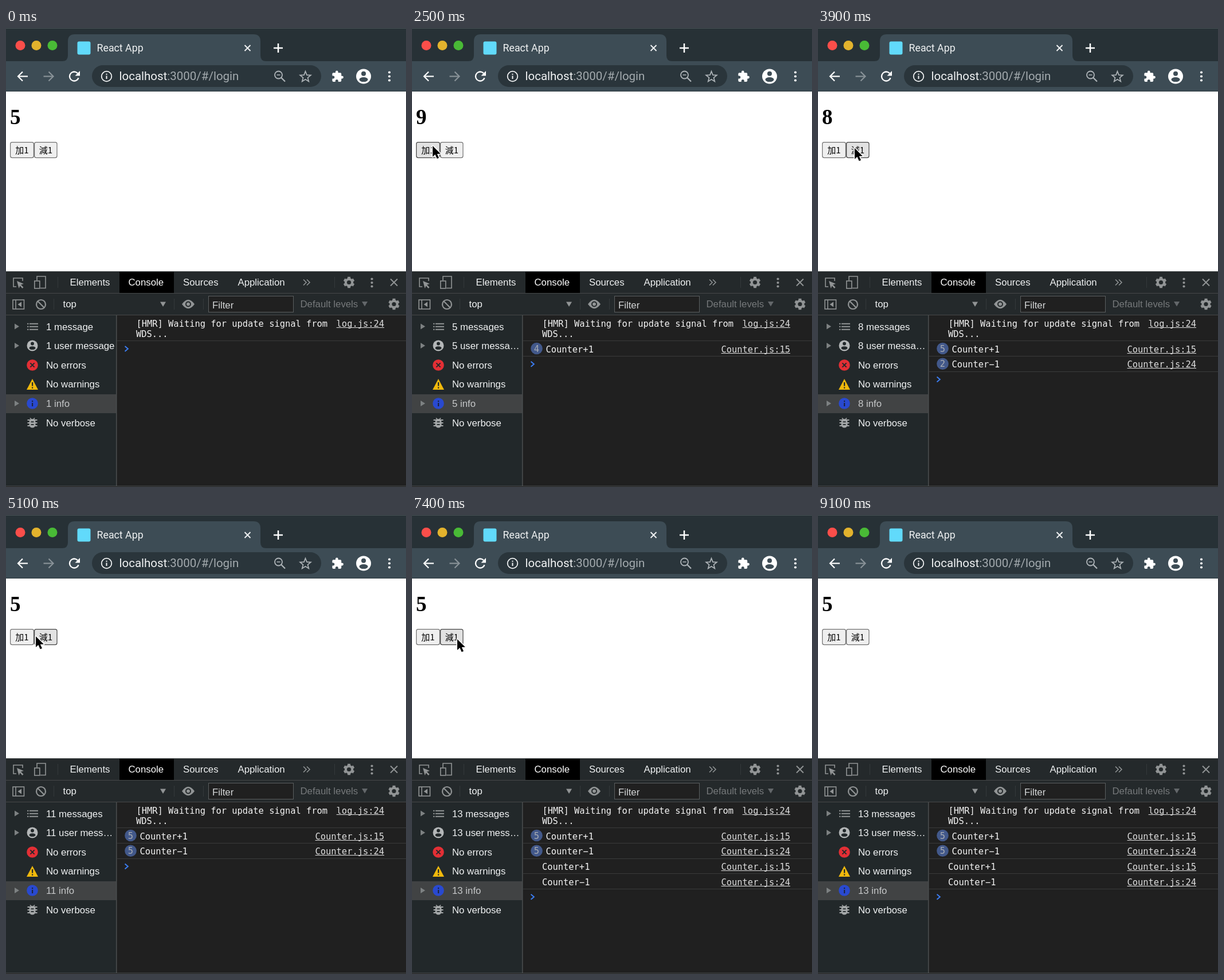
An HTML page with a canvas for the animation above (9.2 s loop, 698 by 802 pixels).

```html
<!DOCTYPE html>
<html lang="en">
<head>
<meta charset="utf-8">
<title>Counter</title>
<style>
html, body { margin: 0; width: 100%; height: 100%; overflow: hidden; background: #202124; }
canvas { display: block; }
</style>
</head>
<body>
<canvas id="stage" width="698" height="802"></canvas>
<script>
const c = document.getElementById('stage').getContext('2d');
const LOOP = 9200, TAU = Math.PI * 2;
const SANS = '16.8px "Liberation Sans", Arial, sans-serif';
const MONO = '15.4px "DejaVu Sans Mono", monospace';
const UI = 'Roboto, sans-serif';
const CJK = '15px "Noto Sans CJK TC", "Noto Sans CJK", "Noto Sans CJK SC", sans-serif';
const GREY = '#919495', PALE = '#f0f2f3';

const clicks = [
  [1500, 1], [1750, 1], [2000, 1], [2300, 1], [2700, 1],
  [3500, -1], [3800, -1], [4100, -1], [4400, -1], [4700, -1],
  [5800, 1], [6800, -1]
];
const track = [
  [500, 150, 802], [1100, 36, 206], [2800, 36, 206], [3200, 64, 210],
  [4700, 64, 210], [5100, 52, 212], [5500, 36, 208], [6100, 36, 208],
  [6600, 66, 212], [6900, 66, 212], [7400, 79, 217], [7900, 79, 217], [8500, 150, 802]
];

function box(x, y, w, h, fill) {
  c.fillStyle = fill;
  c.fillRect(x, y, w, h);
}
function round(x, y, w, h, r, fill, stroke) {
  c.beginPath();
  c.roundRect(x, y, w, h, r);
  if (fill) { c.fillStyle = fill; c.fill(); }
  if (stroke) { c.strokeStyle = stroke; c.lineWidth = 1.2; c.stroke(); }
}
function disc(x, y, r, fill) {
  c.beginPath();
  c.arc(x, y, r, 0, TAU);
  c.fillStyle = fill;
  c.fill();
}
function ring(x, y, r, color, width = 2) {
  c.beginPath();
  c.arc(x, y, r, 0, TAU);
  c.strokeStyle = color;
  c.lineWidth = width;
  c.stroke();
}
function trace(points, closed) {
  c.beginPath();
  points.forEach(([x, y]) => c.lineTo(x, y));
  if (closed) c.closePath();
}
function line(points, color, width = 2, closed = false) {
  trace(points, closed);
  c.strokeStyle = color;
  c.lineWidth = width;
  c.stroke();
}
function poly(points, fill) {
  trace(points, true);
  c.fillStyle = fill;
  c.fill();
}
function text(s, x, y, font, fill, align = 'left') {
  c.font = font;
  c.textAlign = align;
  c.fillStyle = fill;
  c.fillText(s, x, y);
}
function cross(x, y, r, color, width = 2) {
  line([[x - r, y - r], [x + r, y + r]], color, width);
  line([[x + r, y - r], [x - r, y + r]], color, width);
}
function dots(x, y, gap, fill) {
  for (let i = -1; i < 2; i++) disc(x, y + i * gap, 2.1, fill);
}
function gear(x, y, r, fill, hole) {
  const pts = [];
  for (let i = 0; i < 6; i++) {
    const a = i / 6 * TAU + Math.PI / 2;
    for (const [da, k] of [[-.34, .77], [-.25, 1], [.25, 1], [.34, .77]])
      pts.push([x + Math.cos(a + da) * r * k, y + Math.sin(a + da) * r * k]);
  }
  poly(pts, fill);
  disc(x, y, r * .36, hole);
}
function star(x, y, r) {
  const pts = [];
  for (let i = 0; i < 10; i++) {
    const a = i * Math.PI / 5 - Math.PI / 2, k = i % 2 ? r * .43 : r;
    pts.push([x + Math.cos(a) * k, y + Math.sin(a) * k]);
  }
  line(pts, '#aeb4b8', 1.7, true);
}
function account(x, y, r, fill, back) {
  disc(x, y, r, fill);
  disc(x, y - r * .37, r * .31, back);
  c.beginPath();
  c.ellipse(x, y + r * .43, r * .58, r * .31, 0, 0, TAU);
  c.fillStyle = back;
  c.fill();
}
function shape(d, x, y, k, fill) {
  c.save();
  c.translate(x, y);
  c.scale(k, k);
  c.fillStyle = fill;
  c.fill(new Path2D(d));
  c.restore();
}

function drawTabs() {
  box(0, 0, 698, 58, '#273136');
  box(0, 0, 698, 1, '#4a5357');
  box(0, 58, 698, 53, '#3d4c55');
  box(0, 110, 698, 1, '#2d393f');
  disc(25, 30.5, 8.5, '#fb4e4a');
  disc(53, 30.5, 8.5, '#e3b32d');
  disc(81, 30.5, 8.5, '#49ba36');
  c.fillStyle = '#3d4c55';
  c.fill(new Path2D('M98 58Q108 58 108 48V23Q108 11 120 11H432Q444 11 444 23V48Q444 58 454 58Z'));
  round(124.5, 23.5, 23, 23, 3, '#61dafb');
  text('React App', 158.5, 41, '17.8px ' + UI, PALE);
  cross(421.5, 35, 5, PALE);
  line([[467, 35], [483, 35]], '#fff', 2.5);
  line([[475, 27], [475, 43]], '#fff', 2.5);
}

function drawAddress() {
  const arrow = (x, dir, color) => {
    line([[x - 9 * dir, 84.5], [x + 8 * dir, 84.5]], color, 2.2);
    line([[x, 76.5], [x + 8 * dir, 84.5], [x, 92.5]], color, 2.2);
  };
  arrow(29, -1, '#fff');
  arrow(74.5, 1, '#899298');
  c.beginPath();
  c.arc(119, 84.5, 8, .35, TAU - .75);
  c.strokeStyle = '#fff';
  c.lineWidth = 2.3;
  c.stroke();
  poly([[129, 75], [129, 83.5], [120.5, 83.5]], '#fff');

  round(150, 65, 400, 38, 19, '#2a353b');
  ring(175.5, 84.5, 8.8, PALE, 1.8);
  box(174.5, 83.5, 2, 5.5, PALE);
  box(174.5, 79.8, 2, 2, PALE);
  const font = '20.5px ' + UI;
  text('localhost', 197.5, 91, font, PALE);
  text(':3000/#/login', 197.5 + c.measureText('localhost').width, 91, font, '#a3aaae');
  ring(475.5, 82, 6.5, '#aeb4b8', 1.8);
  line([[480, 86.5], [487, 93.5]], '#aeb4b8', 2.2);
  line([[472.5, 82], [478.5, 82]], '#aeb4b8', 1.5);
  star(522.5, 85.5, 9.8);
  shape('M20.5 11H19V7c0-1.1-.9-2-2-2h-4V3.5a2.5 2.5 0 0 0-5 0V5H4c-1.1 0-2 .9-2 2v3.8h1.5a2.7 2.7 0 0 1 0 5.4H2V20c0 1.1.9 2 2 2h3.8v-1.5a2.7 2.7 0 0 1 5.4 0V22H17c1.1 0 2-.9 2-2v-4h1.5a2.5 2.5 0 0 0 0-5z',
    567.5, 73.5, .93, '#fff');
  account(624, 84.5, 13, '#fff', '#3d4c55');
  dots(669, 84.5, 7, '#fff');
}

function drawPage(count, hover) {
  box(0, 111, 698, 314, '#fff');
  text(count, 7, 167.5, 'bold 37px "Liberation Serif", Times, serif', '#000');
  [['加1', 7.6, 40.8], ['減1', 49.6, 39.4]].forEach(([label, x, w], i) => {
    const on = hover === i;
    round(x, 199.6, w, 27, 3, on ? '#e2e2e2' : '#efefef', on ? '#444' : '#707070');
    text(label, x + w / 2, 219, CJK, '#000', 'center');
  });
}

function drawToolbars() {
  box(0, 425, 698, 77, '#24292b');
  box(0, 425, 698, 1, '#43484a');
  box(0, 463, 698, 1, '#464849');
  box(0, 501, 698, 1, '#464849');
  box(198, 426, 95, 37, '#000');
  [[90, 435], [573, 435], [83, 473], [293, 473], [344, 473]].forEach(([x, y]) => box(x, y, 1, 19, '#34393b'));

  line([[18, 452], [13, 452], [13, 437], [29, 437], [29, 442]], GREY, 1.6);
  poly([[19, 442], [31, 447], [26, 448.5], [30.5, 453], [28.5, 455], [24.5, 450.5], [22.5, 455]], GREY);
  line([[54, 441], [54, 434], [69, 434], [69, 454.5], [60, 454.5]], GREY, 1.6);
  c.strokeRect(49.8, 442, 9, 13);

  text('Elements', 111.5, 450, SANS, PALE);
  text('Console', 213.5, 450, SANS, '#fff');
  text('Sources', 309, 450, SANS, PALE);
  text('Application', 404.5, 450, SANS, PALE);
  for (const x of [519, 525]) line([[x, 439.5], [x + 5, 444.5], [x, 449.5]], GREY, 1.6);
  gear(598.5, 444.5, 10, GREY, '#24292b');
  dots(638.5, 445, 6.5, GREY);
  cross(677, 444.5, 6, GREY, 2);

  c.strokeStyle = GREY;
  c.lineWidth = 1.6;
  c.strokeRect(12, 475, 19.5, 16);
  line([[17, 475], [17, 491]], GREY, 1.6);
  poly([[27, 478.5], [27, 487.5], [20.5, 483]], GREY);
  ring(61, 483, 8, GREY, 2.2);
  line([[55.5, 477.5], [66.5, 488.5]], GREY, 2.2);
  text('top', 99.5, 488, SANS, PALE);
  poly([[269, 478.5], [279, 478.5], [274, 487]], GREY);
  c.fillStyle = GREY;
  c.fill(new Path2D('M307 482.5Q318 467 329 482.5Q318 498 307 482.5Z'));
  disc(318, 482.5, 5, '#24292b');
  disc(318, 482.5, 3, GREY);
  box(354, 469, 147, 28, '#202020');
  c.strokeStyle = '#5b5e5f';
  c.lineWidth = 1;
  c.strokeRect(353.5, 468.5, 148, 28);
  text('Filter', 360, 489.5, SANS, '#d5d7d8');
  text('Default levels', 513.5, 488, SANS, '#76797b');
  poly([[621, 478], [631, 478], [626, 486.5]], '#63676a');
  gear(677, 482.5, 10, GREY, '#24292b');
}

function clip(s, max) {
  c.font = SANS;
  if (c.measureText(s).width <= max) return s;
  while (c.measureText(s + '…').width > max) s = s.slice(0, -1);
  return s + '…';
}

function drawSidebar(total) {
  const side = '#22282a', s = total > 1 ? 's' : '';
  box(0, 502, 192, 298, side);
  box(0, 640, 192, 33, '#414344');
  const labels = [`${total} message${s}`, `${total} user message${s}`, 'No errors', 'No warnings', `${total} info`, 'No verbose'];
  labels.forEach((label, i) => {
    const y = 521.5 + i * 33.6;
    text(clip(label, 121), 70, y + 6, SANS, i === 4 ? '#c6c8c9' : PALE);
    if (i < 2 || i === 4) poly([[15, y - 5], [15, y + 5], [23, y]], '#7d8182');
  });
  for (let i = -1; i < 2; i++) {
    box(37, 520.8 + i * 5, 2.5, 2, GREY);
    box(41, 520.8 + i * 5, 15, 2, GREY);
  }
  account(46, 555, 9.5, '#b4b7b8', side);
  disc(46, 589, 9.8, '#e32f35');
  cross(46, 589, 3.6, side, 2);
  poly([[46, 613], [56, 632], [36, 632]], '#f1b90c');
  box(45, 619, 2.2, 6.5, side);
  box(45, 627.5, 2.2, 2.2, side);
  disc(46, 656, 9.8, '#2949cf');
  box(45, 655, 2.2, 6, '#1c2440');
  box(45, 651, 2.2, 2.2, '#1c2440');
  for (let i = -1; i < 2; i++) box(37.5, 689 + i * 5, 17, 2, '#a5a8a9');
  line([[42, 681.5], [44.5, 684.5]], '#a5a8a9', 1.8);
  line([[50, 681.5], [47.5, 684.5]], '#a5a8a9', 1.8);
  round(40.5, 683, 11, 15.5, 5.5, '#a5a8a9');
  box(43.5, 687.3, 5, 1.8, side);
  box(43.5, 692, 5, 1.8, side);
}

function link(s, y) {
  text(s, 660, y, MONO, '#dedede', 'right');
  const w = c.measureText(s).width;
  box(660 - w, Math.round(y + 1.2), w, 1, '#dedede');
}

function drawConsole(groups) {
  box(192, 502, 506, 300, '#202020');
  box(192, 502, 1.5, 300, '#4b4e4f');
  text('[HMR] Waiting for update signal from', 227.5, 522, MONO, '#f4f4f4');
  text('WDS...', 227, 540, MONO, '#f4f4f4');
  link('log.js:24', 522);
  box(194, 546, 504, 1, '#3a3b3b');
  groups.forEach(({ step, n }, i) => {
    const y = 560.5 + i * 26.7;
    if (n > 1) {
      disc(217.5, y - .5, 10.3, '#42588a');
      text(n, 217.5, y + 5, MONO, '#a9adb3', 'center');
    }
    text(step > 0 ? 'Counter+1' : 'Counter−1', n > 1 ? 233.5 : 227, y + 6, MONO, '#f4f4f4');
    link(step > 0 ? 'Counter.js:15' : 'Counter.js:24', y + 6);
    box(194, Math.round(y + 12.5), 504, 1, '#3a3b3b');
  });
  const y = 560.5 + groups.length * 26.7;
  line([[207.5, y - 4.5], [212.8, y], [207.5, y + 4.5]], '#3b7cf0', 2);
  box(0, 800, 698, 1, '#505354');
  box(0, 801, 698, 1, '#151617');
}

function pointer(t) {
  const i = track.findIndex(k => k[0] > t);
  if (i < 1) return null;
  const [t0, x0, y0] = track[i - 1], [t1, x1, y1] = track[i];
  const p = (t - t0) / (t1 - t0), e = p * p * (3 - 2 * p);
  return [x0 + (x1 - x0) * e, y0 + (y1 - y0) * e];
}

function drawPointer([x, y]) {
  const pts = [[0, 0], [0, 19], [4.4, 15], [7.6, 22.3], [11, 20.9], [7.8, 13.9], [13.8, 13.7]]
    .map(([dx, dy]) => [x + dx, y + dy]);
  c.lineJoin = 'round';
  line(pts, '#fff', 3, true);
  c.lineJoin = 'miter';
  poly(pts, '#000');
}

function draw(t) {
  let count = 5, total = 1;
  const groups = [];
  for (const [at, step] of clicks) {
    if (at > t) break;
    count += step;
    total++;
    const last = groups[groups.length - 1];
    if (last && last.step === step) last.n++;
    else groups.push({ step, n: 1 });
  }
  const pos = pointer(t);
  const over = pos && pos[1] > 199 && pos[1] < 227 && pos[0] > 7 && pos[0] < 90;
  drawTabs();
  drawAddress();
  drawPage(count, over ? (pos[0] < 49 ? 0 : 1) : -1);
  drawToolbars();
  drawConsole(groups);
  drawSidebar(total);
  if (pos) drawPointer(pos);
}

const start = performance.now();
function frame() {
  const t = (performance.now() - start) % LOOP;
  draw(Math.floor(t / 100) * 100);
  requestAnimationFrame(frame);
}
frame();
</script>
</body>
</html>
```
